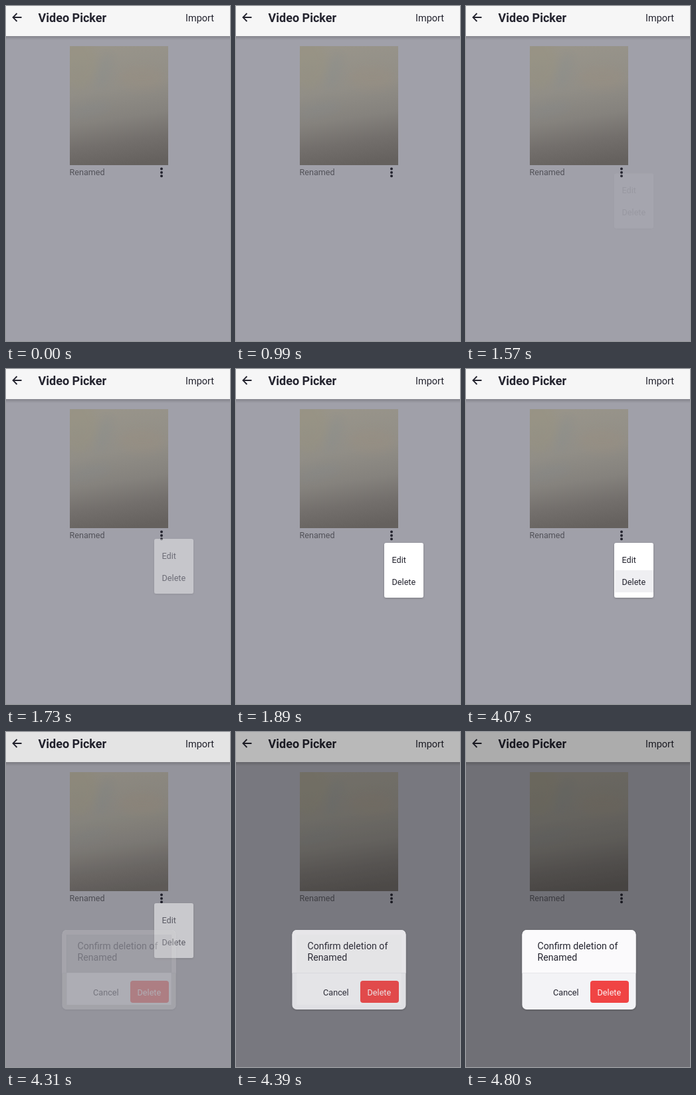
Recreate the animation shown at these times as an HTML page. Size 337 px wide and 501 px high, loop 6680 ms.

```html
<!DOCTYPE html>
<html lang="en">
<head>
<meta charset="utf-8">
<title>Video Picker</title>
<style>
html, body { margin: 0; width: 100%; height: 100%; overflow: hidden; background: #a0a0a9; }
svg { display: block; width: 100vw; height: 100vh; font: 12.7px Roboto, sans-serif; fill: #24242f; }
</style>
</head>
<body>
<svg viewBox="0 0 337 501">
  <defs>
    <linearGradient id="photo" x1=".45" y1="0" x2=".58" y2="1">
      <stop offset="0" stop-color="#98948a"/>
      <stop offset=".35" stop-color="#918e87"/>
      <stop offset=".6" stop-color="#85827d"/>
      <stop offset=".8" stop-color="#736f6c"/>
      <stop offset="1" stop-color="#65615e"/>
    </linearGradient>
    <linearGradient id="fall" x2="0" y2="1">
      <stop stop-opacity=".17"/>
      <stop offset="1" stop-opacity="0"/>
    </linearGradient>
    <filter id="soft" x="-50%" y="-50%" width="200%" height="200%"><feGaussianBlur stdDeviation="7"/></filter>
    <filter id="lift" x="-20%" y="-20%" width="140%" height="140%">
      <feDropShadow dx="0" dy="1" stdDeviation="1.5" flood-opacity=".25"/>
    </filter>
    <clipPath id="frame"><rect x="96" y="60" width="148" height="178"/></clipPath>
    <clipPath id="card"><rect x="84.5" y="296" width="171" height="119" rx="7"/></clipPath>
  </defs>

  <rect width="337" height="501" fill="#a0a0a9"/>
  <rect y="45" width="337" height="6" fill="url(#fall)"/>
  <rect width="337" height="45" fill="#f6f6f6"/>
  <path d="M23.5 17H10.5M16.5 11l-6 6 6 6" fill="none" stroke="#24242f" stroke-width="1.8"/>
  <text x="48.5" y="24" font-size="18" font-weight="700">Video Picker</text>
  <text x="270" y="23" font-size="14.5">Import</text>

  <g clip-path="url(#frame)">
    <rect x="96" y="60" width="148" height="178" fill="url(#photo)"/>
    <g filter="url(#soft)" opacity=".3">
      <ellipse cx="108" cy="85" rx="30" ry="40" fill="#98937c"/>
      <ellipse cx="147" cy="98" rx="10" ry="28" fill="#858d8f" transform="rotate(15 147 98)"/>
      <ellipse cx="125" cy="155" rx="34" ry="9" fill="#84898c" transform="rotate(-15 125 155)"/>
      <ellipse cx="205" cy="108" rx="35" ry="18" fill="#9b8e7d"/>
    </g>
  </g>
  <text x="95.5" y="253" font-size="12.6" fill="#515158">Renamed</text>
  <g><circle cx="234" cy="243.5" r="2"/><circle cx="234" cy="249" r="2"/><circle cx="234" cy="254.2" r="2"/></g>

  <rect id="dim" width="337" height="501" fill="#000"/>

  <g id="menu">
    <rect x="223" y="260" width="59" height="82" rx="3" fill="#fff" filter="url(#lift)"/>
    <rect id="press" x="224" y="301" width="58" height="33" fill="#ececef"/>
    <text x="234.5" y="289.5">Edit</text>
    <text x="234.5" y="322.5">Delete</text>
  </g>

  <g id="dialog">
    <rect x="84.5" y="296" width="171" height="119" rx="7" fill="#f3f3f6" filter="url(#lift)"/>
    <g clip-path="url(#card)">
      <rect x="84" y="296" width="172" height="64" fill="#fbfafc"/>
      <rect x="84" y="360" width="172" height="1" fill="#e6e6ea"/>
    </g>
    <g id="shade">
      <rect x="88" y="299.5" width="164" height="112" rx="4" fill="none" stroke="#000" stroke-width="7" stroke-opacity=".16"/>
      <rect x="91" y="303" width="158" height="57" fill-opacity=".3"/>
    </g>
    <text x="107.5" y="324.5" font-size="14.2">Confirm deletion of</text>
    <text x="107.5" y="342" font-size="14.2">Renamed</text>
    <text x="131" y="393.5">Cancel</text>
    <rect x="187" y="372" width="58" height="33" rx="4" fill="#f04444"/>
    <text x="197.5" y="393.5" fill="#fbf1f3">Delete</text>
  </g>
</svg>
<script>
const LOOP = 6680, STEP = 80;
const el = id => document.getElementById(id);
const [dim, menu, press, dialog, shade] = ["dim", "menu", "press", "dialog", "shade"].map(el);

// The screen refreshes in 80 ms steps; each list holds the value after every step.
function stepped(t, start, values) {
  const i = Math.floor((t - start) / STEP) + 1;
  return values[Math.max(0, Math.min(i, values.length - 1))];
}

function draw(t) {
  const opening = t < 4070;
  const shown = opening
    ? stepped(t, 1570, [0, .06, .2, .4, .8, 1])
    : stepped(t, 4070, [1, 1, 1, .85, .5, 0]);
  const rise = (1 - shown) * (opening ? 10 : 8);
  menu.setAttribute("opacity", shown);
  menu.setAttribute("transform", `translate(0 ${-rise})`);
  press.setAttribute("opacity", t < 3420 ? 0 : stepped(t, 4070, [1, .8, .5, .2, 0]));

  dim.setAttribute("opacity", stepped(t, 4070, [0, 0, .01, .03, .075, .25, .3]));
  const solid = t < 4640 ? stepped(t, 4070, [0, 0, .02, .08, .27, .88, .97]) : 1;
  dialog.setAttribute("opacity", solid);
  shade.setAttribute("opacity", stepped(t, 4070, [1, 1, 1, 1, 1, .1, 0]));
}

const begin = performance.now();
function tick() {
  draw((performance.now() - begin) % LOOP);
  requestAnimationFrame(tick);
}
tick();
</script>
</body>
</html>
```
